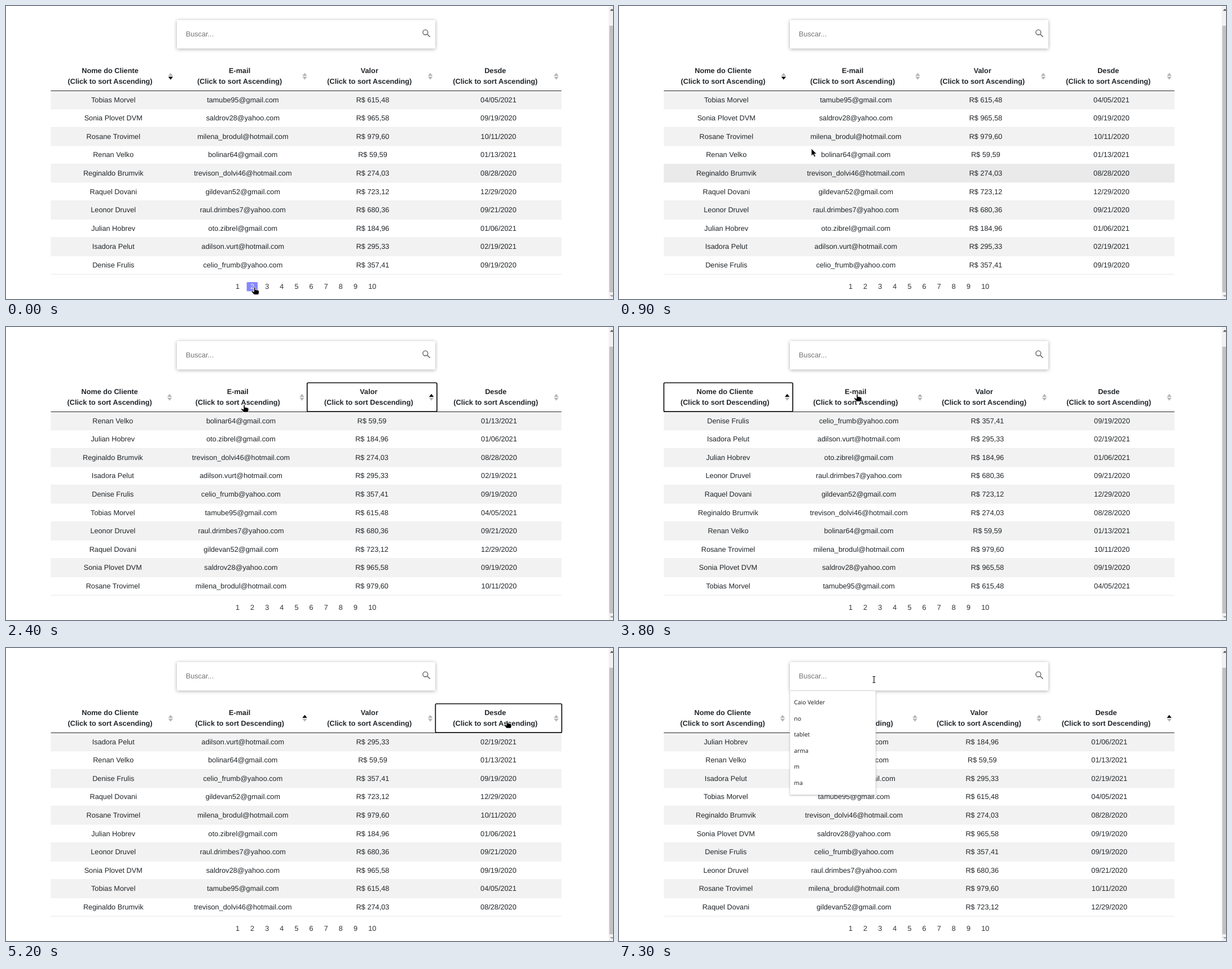
These frames come from a looping animation (1076 by 520 pixels, 8 s). An HTML page:

```html
<!DOCTYPE html>
<html lang="pt">
<head>
<meta charset="utf-8">
<title>Clientes</title>
<style>
  html, body { margin: 0; width: 1076px; height: 520px; overflow: hidden; background: #fff; }
  svg { display: block; text-rendering: geometricPrecision; }
  text { font: 12.72px "Liberation Sans", Arial, sans-serif; fill: #212529; }
  .mid { text-anchor: middle; }
  .head { font-weight: bold; }
  .page { fill: #333; }
  .hint { fill: #757575; }
  .item { font: 10.3px "Noto Sans", sans-serif; fill: #222; }
  .box { filter: drop-shadow(0 1.5px 3px rgba(0, 0, 0, .34)); }
  .menu { filter: drop-shadow(0 1px 1.5px rgba(0, 0, 0, .25)); }
</style>
</head>
<body>
<svg id="stage" width="1076" height="520" viewBox="0 0 1076 520"></svg>
<script>
const LOOP = 8000, LEFT = 79.5, RIGHT = 984.6, TOP = 150.6, ROW = 32.55;

const clients = [
  ['Tobias Morvel', 'tamube95@gmail.com', '615,48', '04/05/2021'],
  ['Sonia Plovet DVM', 'saldrov28@yahoo.com', '965,58', '09/19/2020'],
  ['Rosane Trovimel', 'milena_brodul@hotmail.com', '979,60', '10/11/2020'],
  ['Renan Velko', 'bolinar64@gmail.com', '59,59', '01/13/2021'],
  ['Reginaldo Brumvik', 'trevison_dolvi46@hotmail.com', '274,03', '08/28/2020'],
  ['Raquel Dovani', 'gildevan52@gmail.com', '723,12', '12/29/2020'],
  ['Leonor Druvel', 'raul.drimbes7@yahoo.com', '680,36', '09/21/2020'],
  ['Julian Hobrev', 'oto.zibrel@gmail.com', '184,96', '01/06/2021'],
  ['Isadora Pelut', 'adilson.vurt@hotmail.com', '295,33', '02/19/2021'],
  ['Denise Frulis', 'celio_frumb@yahoo.com', '357,41', '09/19/2020']
];
const titles = ['Nome do Cliente', 'E-mail', 'Valor', 'Desde'];
const recent = ['Caio Velder', 'no', 'tablet', 'arma', 'm', 'ma'];

const wide = [301, 538.7, 761.3];
const byValue = [299.2, 533.8, 763.3];
const byName = [307.4, 542.8, 763.3];
const byDate = [299.2, 533.8, 753.8];

// start, sorted column, direction, focused column, inner column edges
const scenes = [
  [0, 0, -1, -1, wide],
  [1800, 0, -1, 2, wide],
  [2000, 2, 1, 2, byValue],
  [3800, 0, 1, 0, byName],
  [3900, 0, 1, 1, byName],
  [4100, 1, 1, 1, wide],
  [5200, 1, 1, 3, wide],
  [5400, 3, 1, 3, byDate],
  [6900, 3, 1, -1, byDate]
];

// start, x, y, pointer, hovered row
const moves = [
  [0, 441, 499, 'hand', -1],
  [500, 436, 450, 'arrow', 9],
  [600, 420, 392, 'arrow', 7],
  [700, 400, 335, 'arrow', 5],
  [900, 341, 253, 'arrow', 4],
  [1000, 381, 199, 'arrow', 2],
  [1100, 422.5, 143, 'hand', -1],
  [1200, 474, 131, 'hand', -1],
  [1300, 545, 125, 'hand', -1],
  [1400, 607, 128, 'hand', -1],
  [1500, 633, 132, 'hand', -1],
  [2300, 500, 137, 'hand', -1],
  [2400, 422.5, 138, 'hand', -1],
  [3800, 422.5, 119, 'hand', -1],
  [4200, 595, 128, 'hand', -1],
  [4400, 652, 134, 'hand', -1],
  [4600, 752, 141, 'hand', -1],
  [4700, 849, 146, 'hand', -1],
  [4900, 870, 138, 'hand', -1],
  [5000, 888.5, 129, 'hand', -1],
  [5800, 862, 156, 'arrow', 0],
  [6000, 720, 138, 'hand', -1],
  [6100, 580, 122, 'hand', -1],
  [6300, 518, 88, 'arrow', -1],
  [6900, 452, 50, 'beam', -1]
];

const pointers = {
  arrow: '<path d="M0 0V13.2L3 10.4L5.2 15L7.4 14L5.3 9.6H9.4Z" fill="#000" stroke="#fff" stroke-width=".8"/>',
  hand: '<path d="M-1.5 1Q-1.5 0 -.3 0T1 1.2V4.6Q2.4 4 3.4 5Q4.8 4.5 5.7 5.6Q7.6 5.4 7.6 7.2V10Q7.2 11.5 6.5 13.3H-1.6Q-3 10.6 -5.6 8.6Q-6.6 7.5 -5.5 6.9Q-4.2 6.4 -1.5 8.2Z" fill="#000" stroke="#fff" stroke-width=".9"/>',
  beam: '<path d="M-2.5 .5H-.8L0 1L.8 .5H2.5M0 1V11M-2.5 11.5H-.8L0 11L.8 11.5H2.5" fill="none" stroke="#111" stroke-width="1.2"/>'
};

const rect = (x, y, w, h, fill, more = '') =>
  `<rect x="${x}" y="${y}" width="${w}" height="${h}" fill="${fill}" ${more}/>`;
const text = (x, y, str, cls = '', more = '') =>
  `<text x="${x}" y="${y}" class="${cls}" ${more}>${str}</text>`;
const tri = (x, y, half, h, fill) =>
  `<path d="M${x - half} ${y}H${x + half}L${x} ${y + h}Z" fill="${fill}"/>`;
const at = (list, t) => list.filter(e => e[0] <= t).pop();

function sorted(col, dir) {
  const num = r => parseFloat(r[2].replace(',', '.'));
  const cmp = (a, b) => col === 2 ? num(a) - num(b) : a[col] < b[col] ? -1 : a[col] > b[col] ? 1 : 0;
  return [...clients].sort((a, b) => dir * cmp(a, b));
}

function searchBox() {
  return rect(303, 25, 458, 50.5, '#fff', 'class="box" rx="1"') +
    text(318.7, 54, 'Buscar...', 'hint') +
    '<g fill="none" stroke="#757575" stroke-width="1.6"><circle cx="743.4" cy="46.7" r="4.4"/><path d="M746.6 49.9L751.6 54.9"/></g>';
}

function header(col, dir, edges) {
  return titles.map((title, i) => {
    const x = (edges[i] + edges[i + 1]) / 2 - 5.7, ax = edges[i + 1] - 9.2;
    const on = i === col, order = on && dir > 0 ? 'Descending' : 'Ascending';
    return text(x, 119, title, 'mid head') +
      text(x, 138, `(Click to sort ${order})`, 'mid head') +
      tri(ax, 124, 4.2, -5.2, on && dir > 0 ? '#000' : '#b5b5b5') +
      tri(ax, 125.6, 4.2, 5.2, on && dir < 0 ? '#000' : '#b5b5b5');
  }).join('');
}

function body(rows, edges, hover) {
  return rows.map((row, i) => {
    const y = TOP + i * ROW;
    const fill = i === hover ? '#eaeaea' : i % 2 ? '#fff' : '#f2f2f2';
    return rect(LEFT, y, RIGHT - LEFT, ROW, fill) +
      rect(LEFT, y + ROW - .4, RIGHT - LEFT, .8, '#dee2e6') +
      row.map((cell, c) => text((edges[c] + edges[c + 1]) / 2, y + 20.2,
        c === 2 ? 'R$ ' + cell : cell, 'mid')).join('');
  }).join('');
}

function pages(active) {
  let out = '';
  for (let n = 1; n <= 10; n++) {
    const x = n < 10 ? 384.4 + n * 26.12 : 649.3;
    if (n === active) out += rect(x - 10, 490, 19.5, 16.3, '#8888ff', 'rx="1.5"');
    out += text(x, 502.3, n, 'mid page', n === active ? 'style="fill:#eef"' : '');
  }
  return out;
}

function scrollbar() {
  return rect(1068.3, 0, 8, 520, '#f1f1f1') + rect(1069.5, 35, 7, 473, '#c1c1c1') +
    tri(1074, 8.5, 3.4, -3.4, '#505050') + tri(1074, 513, 3.4, 3.4, '#a3a3a3');
}

function menu() {
  return rect(303, 76, 152, 184.5, '#fff', 'class="menu" stroke="#ddd" stroke-width=".6"') +
    recent.map((word, i) => text(310.3, 100.3 + i * 28.5, word, 'item')).join('');
}

function render(t) {
  const [, col, dir, focus, inner] = at(scenes, t);
  const [, x, y, kind, hover] = at(moves, t);
  const edges = [LEFT, ...inner, RIGHT];
  const open = t >= 6900;
  let out = rect(0, 0, 1076, 520, '#fff') + searchBox() + header(col, dir, edges) +
    body(sorted(col, dir), edges, hover) +
    rect(LEFT, 150.1, RIGHT - LEFT, .9, '#111');
  if (focus >= 0) {
    out += rect(edges[focus], 99, edges[focus + 1] - edges[focus] + .6, 51.2, 'none',
      'rx="2" stroke="#101010" stroke-width="1.7"');
  }
  out += pages(t < 500 ? 2 : 0) + scrollbar();
  if (open) out += menu();
  if (open && t < 7300) out += rect(319, 44, .9, 13, '#111');
  return out + `<g transform="translate(${x} ${y})">${pointers[kind]}</g>`;
}

const stage = document.getElementById('stage');
let last = '';
function tick() {
  const html = render(performance.now() % LOOP);
  if (html !== last) stage.innerHTML = last = html;
  requestAnimationFrame(tick);
}
tick();
</script>
</body>
</html>
```
